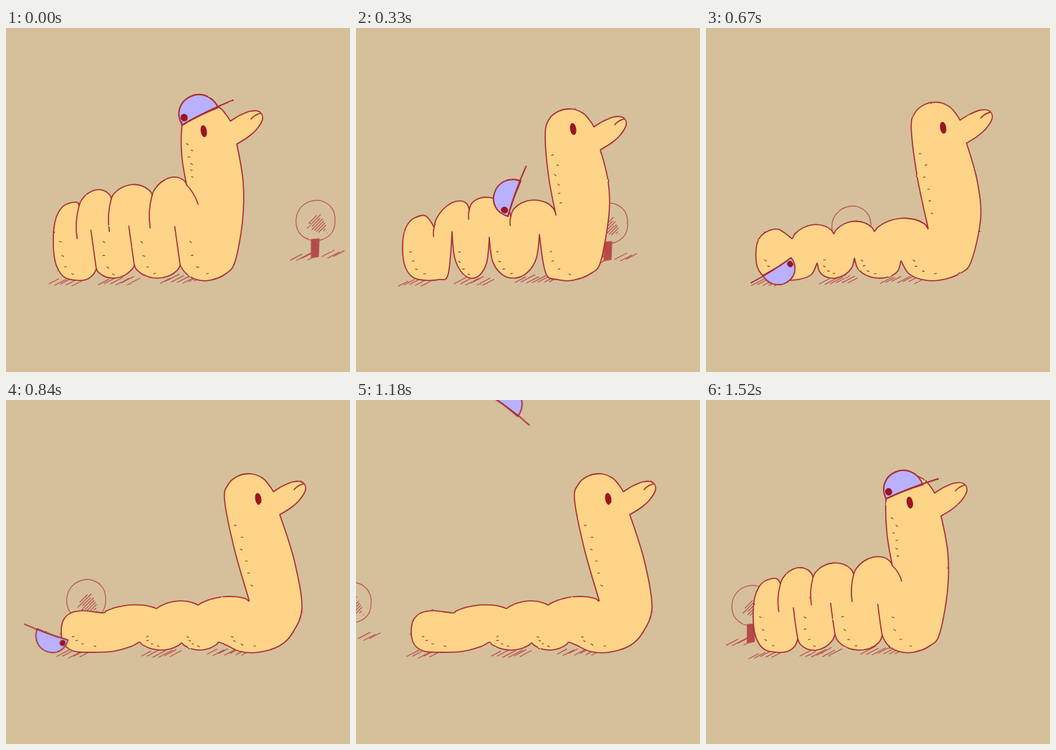
An HTML page that plays this animation: 480x480 px, repeating every 1680 ms.

```html
<!DOCTYPE html>
<html lang="en">
<head>
<meta charset="utf-8">
<title>Caterpillar and cap</title>
<style>
  html, body { margin: 0; width: 100%; height: 100%; overflow: hidden; background: #d5c09b; }
  svg { display: block; width: 100%; height: 100%; }
  path { fill: none; stroke: #a92a34; stroke-width: 1.6; stroke-linecap: round; stroke-linejoin: round; }
  #body { fill: #fed588; }
  #ground, #tree path { stroke: #b9524e; stroke-width: 1.2; }
  #freckles { stroke-width: 1.1; }
  #tree .trunk { fill: #b54a48; }
  #cap path { stroke-width: 2; }
  #dome { fill: #b9b1fb; }
  .dark { fill: #a0141f; stroke: #8c1320; }
</style>
</head>
<body>
<svg viewBox="0 0 480 480">
  <defs>
    <filter id="pencil" filterUnits="userSpaceOnUse" x="0" y="0" width="480" height="480" color-interpolation-filters="sRGB">
      <feTurbulence type="fractalNoise" baseFrequency=".1" numOctaves="2" seed="4"/>
      <feDisplacementMap in="SourceGraphic" scale="1.7" xChannelSelector="R" yChannelSelector="G"/>
    </filter>
  </defs>
  <rect width="480" height="480" fill="#d5c09b"/>
  <g filter="url(#pencil)">
    <g id="tree">
      <path id="crown"/>
      <path id="leaves"/>
      <path class="trunk" d="M-6 26 L5 25 L4 50 L-6 52Z"/>
      <path id="grass"/>
    </g>
    <path id="ground"/>
    <path id="body"/>
    <path id="creases"/>
    <path id="freckles"/>
    <g id="face">
      <path d="M29 -3 Q34 -9 42 -11"/>
      <ellipse id="eye" class="dark" rx="3.8" ry="7.8"/>
    </g>
    <g id="cap">
      <path id="dome" d="M-28 0 C-31 -40 27 -42 28 0 Q0 -2 -28 0Z"/>
      <path d="M-28 0 Q10 -3 51 0"/>
      <ellipse class="dark" cx="-21" cy="-8" rx="4.4" ry="4.8"/>
    </g>
  </g>
</svg>
<script>
const el = id => document.getElementById(id);
const set = (id, name, value) => el(id).setAttribute(name, value);
const lerp = (a, b, k) => a + (b - a) * k;
const clamp = (v, lo, hi) => Math.max(lo, Math.min(hi, v));
const noise = n => { const v = Math.sin(n * 12.9898) * 43758.5453; return v - Math.floor(v); };
const pt = (x, y, sharp = 0) => ({ x, y, sharp });

// closed smooth curve; sharp = 1 turns a point into a corner
function spline(pts) {
  const n = pts.length, at = i => pts[(i + n) % n];
  let d = `M${pts[0].x} ${pts[0].y}`;
  pts.forEach((p, i) => {
    const o = at(i - 1), q = at(i + 1), r = at(i + 2);
    const a = (1 - p.sharp) / 6, b = (1 - q.sharp) / 6;
    d += `C${p.x + (q.x - o.x) * a} ${p.y + (q.y - o.y) * a} ` +
         `${q.x - (r.x - p.x) * b} ${q.y - (r.y - p.y) * b} ${q.x} ${q.y}`;
  });
  return d + 'Z';
}

// rounded lobe between two notches; deep lobes are boxier
function lobe(p, q, depth) {
  const round = clamp(2.2 - Math.abs(depth) / 20, .8, 1.9);
  return [1, 2, 3, 4, 5].map(i => {
    const a = i * Math.PI / 6, k = (1 - Math.cos(a)) / 2;
    return pt(lerp(p.x, q.x, k), lerp(p.y, q.y, k) + depth * Math.sin(a) ** round);
  });
}

function shade(from, to, y) {
  let d = '';
  for (let x = from; x <= to; x += 8) {
    const w = 12 + 9 * noise(x), b = y + 3 + 4 * noise(x + 3);
    d += `M${x} ${b}l${w} ${-w * .52}`;
  }
  return d;
}

// top and low: notches between the lobes, from left to right
const shapes = {
  tall: { head: [313, 130], eye: [-37, 14], front: [330, 270], tail: [98, 243],
    top: [102, 248, 147, 238, 204, 233, 252, 219], low: [126, 336, 179, 331, 243, 331],
    rise: [17], fold: [46], seam: [54], sharp: [1] },
  loose: { head: [332, 138], eye: [-29, 3], front: [353, 260], tail: [97, 262],
    top: [109, 278, 158, 254, 216, 263, 279, 261], low: [134, 284, 186, 292, 256, 288],
    rise: [22], fold: [13], seam: [0], sharp: [1] },
  bumpy: { head: [343, 129], eye: [-25, 11], front: [365, 250], tail: [97, 273],
    top: [111, 292, 159, 285, 215, 283, 292, 279], low: [136, 322, 184, 310, 257, 317],
    rise: [21], fold: [8], seam: [0], sharp: [1] },
  flat: { head: [373, 128], eye: [-21, 10], front: [413, 290], tail: [109, 294],
    top: [135, 297, 210, 291, 268, 286, 339, 279], low: [186, 338, 245, 339, 297, 338],
    rise: [8], fold: [0], seam: [0], sharp: [0] }
};
const blend = (a, b, k) => Object.fromEntries(
  Object.keys(a).map(n => [n, a[n].map((v, i) => lerp(v, b[n][i], k))]));

// stretch out, hold, then pull together
const cycle = [
  ['tall', 'loose', 0], ['tall', 'loose', .5], ['loose', 'flat', 0], ['loose', 'flat', .33],
  ['bumpy', 'flat', .38], ['bumpy', 'flat', 1], ['bumpy', 'flat', 1.1], ['bumpy', 'flat', 1],
  ['bumpy', 'flat', 0], ['tall', 'bumpy', .2]
].map(([a, b, k]) => blend(shapes[a], shapes[b], k));

const pairs = list => list.reduce((out, v, i) => (i % 2 ? out[out.length - 1].push(v) : out.push([v]), out), []);
const skull = pairs([-68, 12, -63, -10, -49, -22, -31, -25, -15, -19, -5, -8]);
const beak = pairs([13, -8, 28, -14, 41, -13, 45, -3, 37, 11, 25, 22]);
const floor = 352;

function drawBug(s) {
  const [hx, hy] = s.head, [fx, fy] = s.front, [tx, ty] = s.tail;
  const [rise, fold, seam, sharp] = [s.rise, s.fold, s.seam, s.sharp].map(v => v[0]);
  const top = pairs(s.top).map(([x, y]) => pt(x, y, sharp));
  const low = pairs(s.low).map(([x, y]) => pt(x, y, sharp));
  const nape = top[3], chest = low[2];
  nape.sharp = Math.max(sharp, .6);
  const onHead = ([x, y]) => pt(hx + x, hy + y);
  const under = (p, q) => lobe(p, q, 349 - (p.y + q.y) / 2);
  const over = i => lobe(top[i], top[i + 1], -rise);
  const belly = [[.12, 26], [.27, 9], [.52, 0], [.74, 1], [.91, 10]]
    .map(([k, up]) => pt(lerp(fx, chest.x, k), floor - up));
  const rump = Array.from({ length: 9 }, (_, i) => {
    const a = i * Math.PI / 8, bend = v => Math.sign(v) * Math.abs(v) ** .8;
    return pt(tx - 32 * bend(Math.sin(a)), (floor + ty) / 2 + (floor - ty) / 2 * bend(Math.cos(a)));
  });
  const neck = pt((nape.x + hx - 68) / 2 - 3, (nape.y + hy + 12) / 2);

  set('body', 'd', spline([
    nape, neck, ...skull.map(onHead), pt(hx, hy, 1), ...beak.map(onHead), pt(hx + 9, hy + 32, 1),
    pt((hx + 9 + fx) / 2 + 5, (hy + 32 + fy) / 2), pt(fx, fy), ...belly,
    low[2], ...under(low[2], low[1]), low[1], ...under(low[1], low[0]), low[0],
    pt(lerp(low[0].x, tx, .15), floor - 8), pt(lerp(low[0].x, tx, .5), floor - 1), ...rump,
    top[0], ...over(0), top[1], ...over(1), top[2], ...over(2)
  ]));

  let d = '';
  if (fold > 5) for (const p of top.slice(0, 3)) d += `M${p.x} ${p.y}q${-fold * .14} ${fold * .5} ${-fold * .06} ${fold}`;
  if (seam > 5) {
    for (const p of low) d += `M${p.x} ${p.y}q-3 ${-seam * .4} ${-seam * .14} ${-seam}`;
    d += `M${nape.x} ${nape.y}q10 10 ${seam * .3} ${seam * .5}`;
  }
  set('creases', 'd', d);

  // freckles run down the neck and along the underside of each lobe
  d = '';
  const fleck = (x, y) => { d += `M${x} ${y}l2.6 ${noise(x + y) * 3 - 1}`; };
  for (let i = 0; i < 6; i++) {
    const k = .25 + i * .12;
    fleck(lerp(hx - 68, nape.x, k) + 5 + 6 * noise(i), lerp(hy + 12, nape.y, k));
  }
  const plump = (floor - ty) / 110;
  [tx - 32, ...low.map(p => p.x)].forEach((x, i, xs) => {
    const w = (xs[i + 1] || fx) - x;
    for (let j = 0; j < 4; j++) fleck(x + w * (.14 + .03 * j * j) + 2 * noise(i + j), floor - 9 - 46 * (1 - j / 3) ** 1.4 * plump ** 2);
  });
  set('freckles', 'd', d);

  set('ground', 'd', shade(tx - 38, tx - 2, 354) +
    shade(low[0].x + 3, low[0].x + 44, 352) + shade(low[1].x + 36, low[1].x + 84, 350));
  set('face', 'transform', `translate(${hx} ${hy})`);
  set('eye', 'transform', `translate(${s.eye}) rotate(-10)`);
}

// linear path through [time, ...values]
function track(keys, t) {
  const i = clamp(keys.findIndex(k => k[0] > t), 1, keys.length - 1);
  const a = keys[i - 1], b = keys[i], k = (t - a[0]) / (b[0] - a[0]);
  return a.slice(1).map((v, j) => lerp(v, b[j + 1], k));
}
const capPath = [
  [0, 271, 123, -26], [330, 221, 238, -70], [670, 99, 333, -212], [840, 65, 327, -160],
  [1180, 206, 8, -323], [1350, 283, 68, -390], [1520, 277, 128, -381], [1680, 271, 123, -386]
];
const treePath = [[0, 432], [330, 352], [670, 203], [840, 112], [1180, -6], [1520, -120]];

const crown = Array.from({ length: 10 }, (_, i) => {
  const a = i / 10 * 2 * Math.PI, r = 27 + 2 * noise(i + 2);
  return pt(r * Math.cos(a), r * Math.sin(a));
});
set('crown', 'd', spline(crown));

// diagonal strokes kept inside the crown
let leaves = '';
for (let i = 0; i < 10; i++) {
  const c = -6 + i * 4.4, half = Math.sqrt(Math.max(0, 320 - c * c / 2)) * (.5 + .4 * noise(i));
  leaves += `M${c / 2 - half * .7} ${c / 2 + half * .7}l${half * 1.2} ${-half * 1.2}`;
}
set('leaves', 'd', leaves);
set('grass', 'd', shade(-35, -8, 49) + shade(9, 26, 46));

const period = 1680, hold = 170;
let shown = -1;

function draw(i) {
  const t = Math.max(0, i * hold - 10);
  drawBug(cycle[i]);
  const [x, y, angle] = track(capPath, t);
  const size = .91 + .09 * Math.cos(2 * Math.PI * t / period);
  set('cap', 'transform', `translate(${x} ${y}) rotate(${angle}) scale(${size})`);
  set('tree', 'transform', `translate(${track(treePath, t)} ${269 + t * .012})`);
}

const start = performance.now();
function tick() {
  const i = Math.floor(((performance.now() - start) % period + 10) / hold);
  if (i !== shown) draw(shown = i);
  requestAnimationFrame(tick);
}
tick();
</script>
</body>
</html>
```
